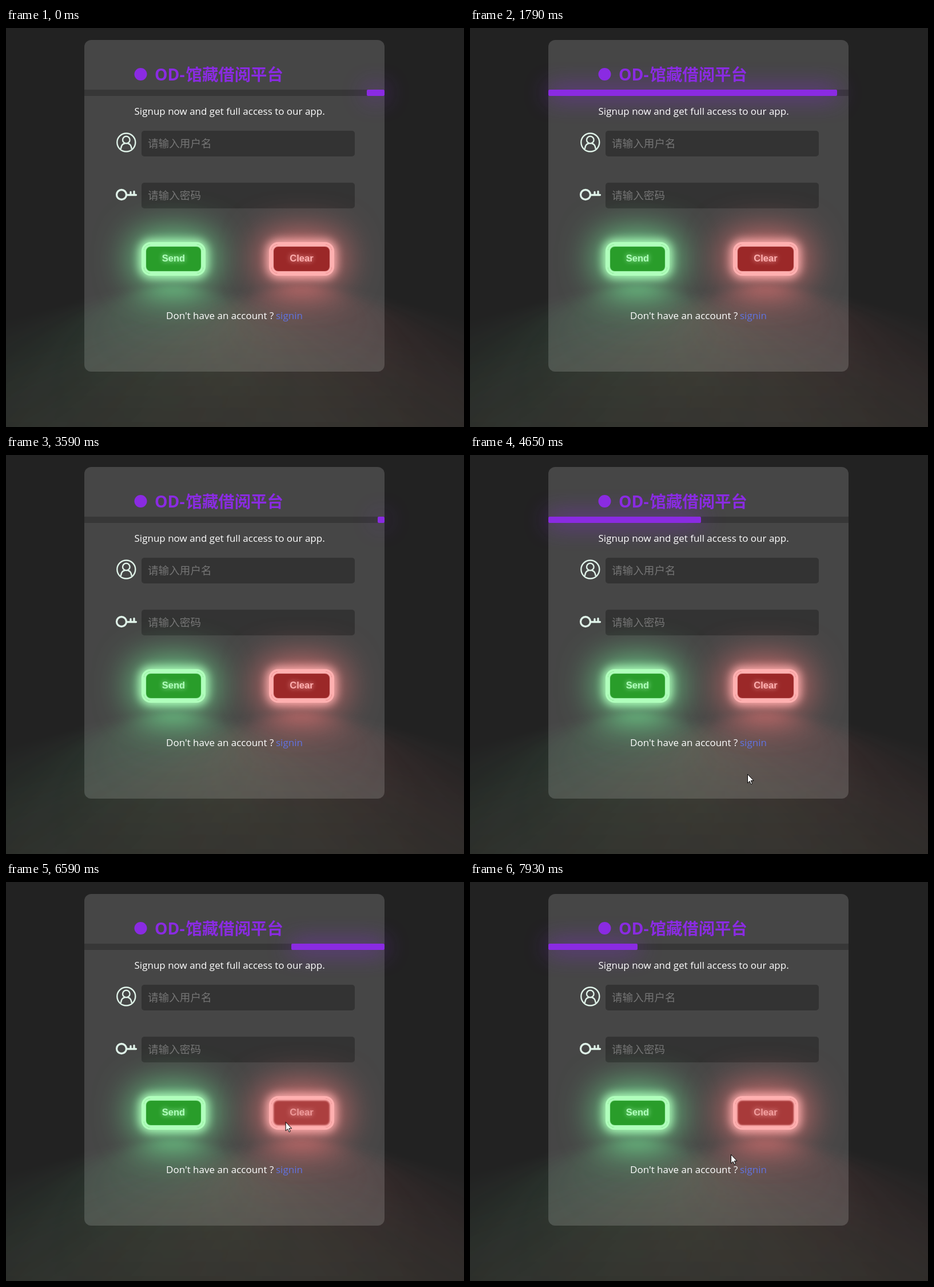
Write an HTML page that moves like this. It is 801 px wide and 699 px high and loops after 7.99 s.

```html
<!DOCTYPE html>
<html lang="zh">
<head>
<meta charset="utf-8">
<title>Signup</title>
<style>
html, body { margin: 0; width: 100%; height: 100%; overflow: hidden; background: #222; }
#stage { position: relative; width: 801px; height: 699px; overflow: hidden; background: #222; }
#stage > *, #bar { position: absolute; }
.panel { left: 137px; top: 21px; width: 525px; height: 581px; border-radius: 12px; background: rgba(255, 255, 255, .16); }
.track { left: 137px; top: 108px; width: 525px; height: 11px; background: rgba(0, 0, 0, .22); }
#bar { top: 0; bottom: 0; border-radius: 2px; background: #8a2be2; box-shadow: 0 0 40px #8a2be2; }
.field { left: 237px; width: 373px; height: 45px; border-radius: 5px; background: #333; }
svg { left: 0; top: 0; overflow: visible; }
.latin { font: 17px "Open Sans", "Noto Sans", sans-serif; fill: #fff; }
.title { font: bold 28.4px "Open Sans", "Noto Sans", sans-serif; fill: #8a2be2; }
.title .han { font-family: "Noto Sans CJK SC", "Noto Sans CJK", sans-serif; }
.hint { font: 300 18.6px "Noto Sans CJK SC", "Noto Sans CJK", sans-serif; fill: #757575; }
.icon { fill: none; stroke: #dff2e8; stroke-linecap: round; }
.button {
  top: 375px; height: 59px; box-sizing: border-box;
  border: 4px solid var(--glow); border-radius: 16px;
  font: bold 16.5px/49px "Liberation Sans", Arial, sans-serif; text-align: center;
  text-shadow: 0 0 8px var(--glow);
}
.button::after {
  content: ""; position: absolute; top: 120%; left: 0; width: 100%; height: 100%;
  background: var(--spread); filter: blur(32px); opacity: .7;
  transform: perspective(24px) rotateX(35deg) scale(1, .6);
}
#send { left: 237px; width: 112px; --glow: rgb(176, 255, 188); --spread: rgba(123, 255, 160, .78); --fill: rgb(41, 157, 42); }
#clear { left: 460px; width: 114px; --glow: rgb(255, 176, 176); --spread: rgba(255, 123, 123, .78); --fill: rgb(155, 40, 40); }
</style>
</head>
<body>
<div id="stage">
  <div class="panel"></div>
  <div class="track"><div id="bar"></div></div>
  <div class="field" style="top:180px"></div>
  <div class="field" style="top:271px"></div>
  <div id="send" class="button">Send</div>
  <div id="clear" class="button">Clear</div>
  <svg width="801" height="699">
    <circle cx="235.5" cy="81" r="11" fill="#8a2be2"/>
    <text class="title" y="92"><tspan x="260">OD-</tspan><tspan class="han" x="314.500">馆藏借阅平台</tspan></text>
    <text class="latin" x="224.5" y="152">Signup now and get full access to our app.</text>
    <text class="hint" x="248" y="209">请输入用户名</text>
    <text class="hint" x="248" y="300">请输入密码</text>
    <text class="latin" x="280" y="510">Don't have an account ?</text>
    <text class="latin" x="472" y="510" style="fill:#6074e4">signin</text>
    <g class="icon" stroke-width="2.4">
      <circle cx="210.3" cy="200.5" r="16"/>
      <circle cx="210.3" cy="196" r="6.3"/>
      <path d="M201 211Q202 203.500 207 202.500M213.600 202.500Q218.600 203.500 219.600 211"/>
    </g>
    <g class="icon" stroke-width="3.3">
      <circle cx="202" cy="292" r="8.5"/>
      <path d="M211 292.500H227.500M218 292V287.500M224 292V286.500"/>
    </g>
  </svg>
  <svg id="cursor" width="12" height="19">
    <path d="M.5 .5V16L4 12.700 6.400 18 8.600 17 6.300 11.800H11Z" fill="#fff" stroke="#000"/>
  </svg>
</div>
<script>
const LOOP = 7990, STEP = LOOP / 120;
const BAR_PERIOD = 3485, BAR_START = 296;
const FADE = 300, TICK = 10;
const find = id => document.getElementById(id);
const cursor = find('cursor');

function paused(element, frames, duration) {
  const animation = element.animate(frames, { duration, fill: 'both' });
  animation.pause();
  return animation;
}

const bar = paused(find('bar'), [
  { left: '0%', right: '100%', easing: 'ease-in-out' },
  { left: '0%', right: '0%', easing: 'ease-in-out' },
  { left: '100%', right: '0%' }
], BAR_PERIOD);

// Key points of the pointer tip: time, x, y.
const path = [
  [4520, 780, 574], [4660, 485, 559], [5140, 500, 415], [5350, 300, 412],
  [5620, 285, 412], [5793, 284, 462], [6430, 480, 470], [6591, 489, 420],
  [7000, 300, 405], [7500, 500, 400], [7923, 456, 477]
];

function pointerAt(time) {
  if (time < path[0][0]) return null;
  const next = path.findIndex(point => point[0] > time);
  if (next < 0) return path.at(-1).slice(1);
  const [t0, x0, y0] = path[next - 1], [t1, x1, y1] = path[next];
  const part = (time - t0) / (t1 - t0);
  return [x0 + (x1 - x0) * part, y0 + (y1 - y0) * part];
}

const look = (glow, fill, spread, blur) => ({
  backgroundColor: `var(--${fill})`,
  color: `var(--${glow})`,
  boxShadow: `0 0 16px 4px var(--glow), 0 0 64px ${spread}px var(--spread), inset 0 0 ${blur}px 4px var(--glow)`
});

const buttons = ['send', 'clear'].map(id => {
  const element = find(id);
  return {
    left: element.offsetLeft,
    top: element.offsetTop,
    right: element.offsetLeft + element.offsetWidth,
    bottom: element.offsetTop + element.offsetHeight,
    hover: paused(element, [look('glow', 'fill', 16, 1), look('fill', 'glow', 32, 12)], FADE)
  };
});

const covers = (box, [x, y]) => x > box.left && x < box.right && y > box.top && y < box.bottom;

// The highlight rises while the pointer is over the button and falls after it leaves.
function highlight(button, time) {
  let level = 0;
  for (let t = path[0][0]; t < time; t += TICK) {
    const change = covers(button, pointerAt(t)) ? TICK : -TICK;
    level = Math.min(FADE, Math.max(0, level + change));
  }
  return level;
}

const start = performance.now();
function draw(now) {
  const elapsed = Math.max(0, now - start) % LOOP;
  const time = Math.min(119, Math.floor((elapsed + 14) / STEP)) * STEP;
  const tip = pointerAt(time);
  bar.currentTime = (time - BAR_START + BAR_PERIOD) % BAR_PERIOD;
  for (const button of buttons) button.hover.currentTime = highlight(button, time);
  cursor.style.visibility = tip ? 'visible' : 'hidden';
  if (tip) cursor.style.transform = `translate(${tip[0]}px, ${tip[1]}px)`;
  requestAnimationFrame(draw);
}
draw(start);
</script>
</body>
</html>
```
